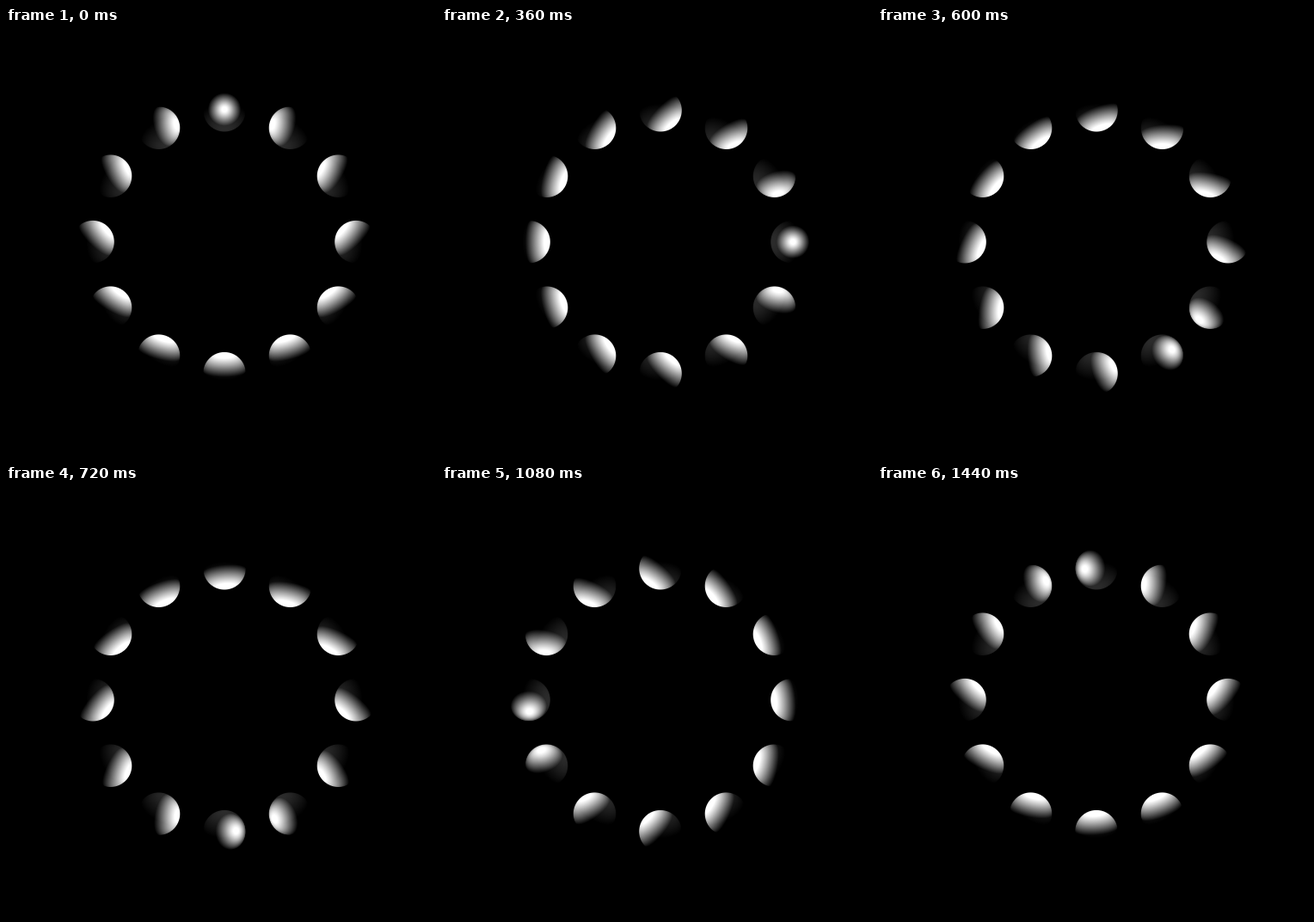
An HTML page with a canvas for the animation above (1480 ms loop, 500 px wide and 500 px high).

```html
<!DOCTYPE html>
<html lang="en">
<head>
<meta charset="utf-8">
<title>Orbiting light</title>
<style>
  html, body { margin: 0; width: 100%; height: 100%; overflow: hidden; background: #000; }
  canvas { display: block; width: 500px; height: 500px; }
</style>
</head>
<body>
<canvas id="stage" width="500" height="500"></canvas>
<script>
const SIZE = 500, CX = 254, CY = 248.7;
const RING = 153, BALL = 24.8, BALLS = 12;
const LIGHT_RING = 151, LIGHT_Z = 39;
const FILL = 0.17, FILL_Z = 55;
const TILT = 0.12; // the camera sees each ball slightly from the middle
const LOOP = 1480, TICK = 40, STEPS = 36, HOLD = 10;

const ctx = document.getElementById('stage').getContext('2d');
const image = ctx.createImageData(SIZE, SIZE);
const pixels = image.data;
for (let i = 3; i < pixels.length; i += 4) pixels[i] = 255;

// Point on a ring around the middle, clockwise from the top
function onRing(turn, radius) {
  const a = turn * 2 * Math.PI;
  return { x: CX + radius * Math.sin(a), y: CY - radius * Math.cos(a) };
}

const balls = Array.from({ length: BALLS }, (_, i) => onRing(i / BALLS, RING));
const middle = { x: CX, y: CY, z: FILL_Z };

// Diffuse light on the ball's surface where its normal is n
function diffuse(n, ball, lamp) {
  const vx = lamp.x - ball.x - n.x * BALL;
  const vy = lamp.y - ball.y - n.y * BALL;
  const vz = lamp.z - n.z * BALL;
  return Math.max(0, (n.x * vx + n.y * vy + n.z * vz) / Math.hypot(vx, vy, vz));
}

// Normal at a point of the disc, turned towards the middle of the ring
function normalAt(px, py, ball) {
  const pz = Math.sqrt(Math.max(0, 1 - px * px - py * py));
  const ix = (CX - ball.x) / RING, iy = (CY - ball.y) / RING;
  const along = px * ix + py * iy;
  const turned = along * Math.cos(TILT) + pz * Math.sin(TILT);
  return {
    x: px + (turned - along) * ix,
    y: py + (turned - along) * iy,
    z: pz * Math.cos(TILT) - along * Math.sin(TILT)
  };
}

function drawBall(ball, light) {
  const reach = BALL + 1;
  for (let y = Math.floor(ball.y - reach); y <= ball.y + reach; y++) {
    for (let x = Math.floor(ball.x - reach); x <= ball.x + reach; x++) {
      const dx = x + 0.5 - ball.x, dy = y + 0.5 - ball.y;
      const r = Math.hypot(dx, dy);
      const cover = Math.min(1, BALL + 0.5 - r);
      if (cover <= 0) continue;
      const scale = Math.max(r, BALL);
      const n = normalAt(dx / scale, dy / scale, ball);
      const lit = diffuse(n, ball, light) + FILL * diffuse(n, ball, middle);
      const p = (y * SIZE + x) * 4;
      pixels[p] = pixels[p + 1] = pixels[p + 2] = 255 * cover * Math.min(1, lit);
    }
  }
}

// One step lasts two ticks, just as the light reaches the right
function stepAt(time) {
  const tick = Math.floor((time % LOOP) / TICK);
  return tick < HOLD ? tick : tick - 1;
}

let shown = -1;
function draw(step) {
  if (step === shown) return;
  shown = step;
  const light = { ...onRing(step / STEPS, LIGHT_RING), z: LIGHT_Z };
  balls.forEach(ball => drawBall(ball, light));
  ctx.putImageData(image, 0, 0);
}

const start = performance.now();
function loop() {
  draw(stepAt(performance.now() - start));
  requestAnimationFrame(loop);
}
draw(0);
requestAnimationFrame(loop);
</script>
</body>
</html>
```
